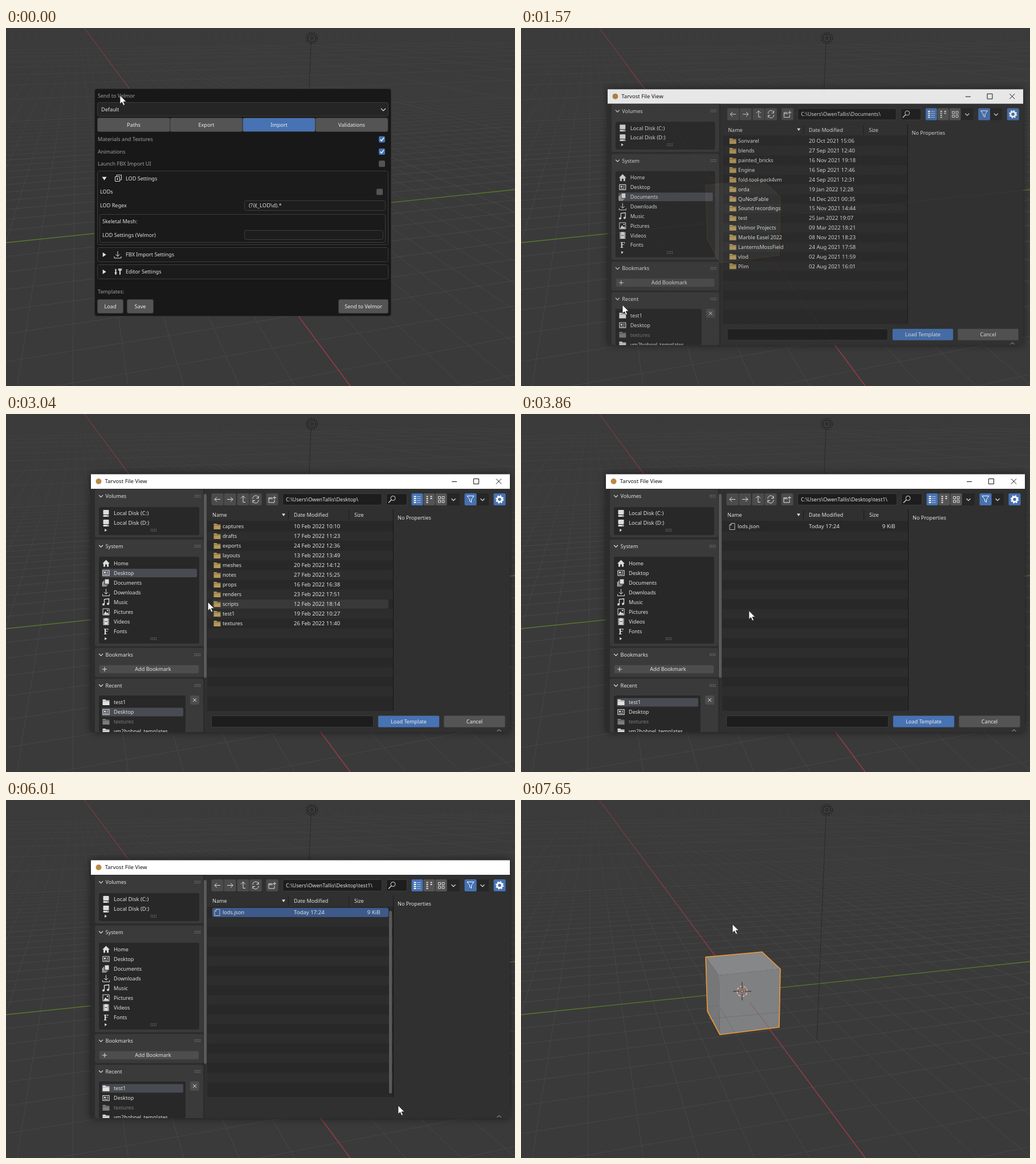
Write an HTML page that moves like this. It is 893 by 627 pixels and loops after 8 s.

```html
<!DOCTYPE html>
<html lang="en">
<head>
<meta charset="utf-8">
<title>Loading a template</title>
<style>
html, body { margin: 0; width: 100%; height: 100%; overflow: hidden; background: #3a3a3a; }
svg { display: block; width: 893px; height: 627px; }
text { font-family: "Noto Sans", "Open Sans", sans-serif; font-size: 9.1px; white-space: pre; }
</style>
</head>
<body>
<svg id="stage" viewBox="0 0 893 627" xmlns="http://www.w3.org/2000/svg"></svg>
<script>
const LOOP = 8000;
const BLUE = '#4772b3', GREY = '#545454', LIGHT = '#e2e2e2', DIM = '#a0a0a0';

// ---- drawing helpers ----
const rect = (x, y, w, h, fill, extra = '') =>
  `<rect x="${x}" y="${y}" width="${w}" height="${h}" fill="${fill}" ${extra}/>`;
const box = (x, y, w, h, fill, stroke = '#3d3d3d', r = 3) =>
  rect(x + .5, y + .5, w - 1, h - 1, fill, `rx="${r}" stroke="${stroke}"`);
const path = (d, stroke = LIGHT, width = 1, fill = 'none', extra = '') =>
  `<path d="${d}" fill="${fill}" stroke="${stroke}" stroke-width="${width}" ${extra}/>`;
const label = (x, cy, str, fill = LIGHT, anchor = 'start', size = 9.1) =>
  `<text x="${x}" y="${cy + 3.4}" fill="${fill}" text-anchor="${anchor}" style="font-size:${size}px">${str}</text>`;
const group = (id, body, extra = '') => `<g id="${id}" ${extra}>${body}</g>`;
const at = (x, y, body, extra = '') => `<g transform="translate(${x} ${y})" ${extra}>${body}</g>`;
const button = (x, y, w, h, str, fill = GREY, id = '', stroke = '#3d3d3d') =>
  rect(x + .5, y + .5, w - 1, h - 1, fill, `rx="2.5" stroke="${stroke}" ${id && `id="${id}"`}`) +
  label(x + w / 2, y + h / 2, str, '#eee', 'middle');
const chevron = (x, y, s = 3.5, c = LIGHT) =>
  path(`M${x - s} ${y - s / 2}l${s} ${s}l${s} ${-s}`, c, 1.2);
const triangle = (x, y, s, down) => down
  ? path(`M${x - s} ${y - s * .7}h${2 * s}l${-s} ${s * 1.5}z`, 'none', 0, LIGHT)
  : path(`M${x - s * .7} ${y - s}v${2 * s}l${s * 1.5} ${-s}z`, 'none', 0, LIGHT);
const grip = (x, y) =>
  path(`M${x - 5} ${y - 1.5}h10M${x - 5} ${y + 1.5}h10`, '#aaa', 1, 'none', 'stroke-dasharray="1.2 1.7"');

const ICONS = {
  disk: rect(-5, -6, 10, 8, '#ddd', 'rx="1"') + rect(-5, 3, 10, 3, '#ddd', 'rx="1"') + rect(2, 4, 2, 1, '#333'),
  home: path('M-6.5 .5L0 -6L6.5 .5H4.5V6H1.5V2H-1.5V6H-4.5V.5z', 'none', 0, '#ddd'),
  desk: path('M-5.5 -4.5h11v9h-11z', '#ddd', 1.2) + rect(-3.5, -2.5, 3, 3, '#ddd') +
    path('M1 -2h2.5M1 0h2.5M-3.5 2.5h7', '#ddd', 1),
  docs: path('M-2 -6H5V2H-2z', 'none', 0, '#ddd') + path('M-4 -3.5V4H3M-6 -1.5V6H1', '#ddd', 1.2),
  down: path('M0 -6V3M-3.5 -.5L0 3L3.5 -.5M-6 3V6H6V3', '#ddd', 1),
  music: path('M-3 4V-5L5 -6V3', '#ddd', 1.3) + '<circle cx="-4.5" cy="4" r="2" fill="#ddd"/><circle cx="3.5" cy="3" r="2" fill="#ddd"/>',
  image: path('M-5.5 -5.5h11v11h-11z', '#ddd') + path('M-4.5 5L-1 -1L1.5 2.5L3 1L5 5z', 'none', 0, '#ddd') + '<circle cx="2.5" cy="-2.5" r="1.2" fill="#ddd"/>',
  film: rect(-5, -6, 10, 12, '#ddd') + path('M-3.7 -6V6M3.7 -6V6', '#333', 1.2, 'none', 'stroke-dasharray="1.5 1.5"') + path('M-2 0H2', '#333'),
  font: '<text y="5" text-anchor="middle" fill="#ddd" style="font:bold 14px \'Noto Serif\',serif">F</text>',
  folder: path('M-6 -5H-1L0 -3.5H6V5H-6z', 'none', 0, 'currentColor') + path('M-6 -2H6', '#0006', .8),
  file: path('M-1.5 -5.5H4.5V5.5H-4.5V-2.5zM-1.5 -5.5V-2.5H-4.5', '#ccc', .9)
};
const icon = (name, x, y, color = '#ddd') => at(x, y, ICONS[name], `color="${color}"`);

// ---- viewport ----
// Ground plane: A and B set the perspective toward each axis' vanishing point.
const A = -.0533, B = .01457;
const ground = (u, v) => {
  const p = A * u, q = B * v, w = 1 + p + q;
  return [(387.3 + 122.6 * p + 3798 * q) / w, (335.6 - 20 * (p + q)) / w].map(n => n.toFixed(1)).join(' ');
};
const gridOpacity = k => k % 10 ? Math.max(0, .75 - Math.abs(k) / 55) : .85;
function grid() {
  let s = '';
  const line = (p, q, k) => {
    if (k && gridOpacity(k) > 0) s += path(`M${p}L${q}`, '#4d4d4d', 1, 'none', `opacity="${gridOpacity(k).toFixed(2)}"`);
  };
  for (let v = -40; v <= 100; v++) line(ground(-110, v), ground((-.8 - B * v) / A, v), v);
  for (let u = -100; u <= 20; u++) line(ground(u, (-.8 - A * u) / B), ground(u, 150), u);
  return s;
}
const lamp = path('M535 28L519 420', '#2a2a2a') +
  at(536.5, 17.5, '<circle r="10" fill="none" stroke="#151515" stroke-dasharray="3 2"/><circle r="7" fill="none" stroke="#151515"/>' +
    path('M0 -3L2.5 0L0 3L-2.5 0z', '#151515'));
const cube =
  path('M324 275L423 266L455 296L347 307z', 'none', 0, '#868788') +
  path('M324 275L347 307L349 411L327 370z', 'none', 0, '#767778') +
  path('M347 307L455 296L453 398L349 411z', 'none', 0, '#7f8081') +
  path('M327 362L347 360L375 408M330 383L453 372', '#6d6e6e', .8) +
  path('M402 355L436 400', '#a0414a', 1, 'none', 'stroke-dasharray="3 1"') +
  path('M324 275L423 266L455 296L453 398L349 411L327 370z', '#f09a35', 1.6, 'none', 'stroke-linejoin="round"') +
  at(388, 335, '<circle r="9" fill="none" stroke="#f2e4df" stroke-width="1.2"/><circle r="9" fill="none" stroke="#c8574c" stroke-width="1.2" stroke-dasharray="3.5 3.5"/>' +
    path('M-16 0H-5M5 0H16M0 -16V-5M0 5V16', '#252525') + '<circle r="2.2" fill="#f09a35" stroke="#222" stroke-width=".7"/>');
const viewport = rect(0, 0, 893, 627, '#3a3a3a') + grid() +
  rect(0, 0, 893, 270, 'url(#haze)') +
  path('M137.5 0L604 627', 'url(#red)', 1.4) + path('M0 376L893 283', '#587b2b', 1.3) + lamp + cube;

// ---- settings popup ----
function checkbox(x, y, on) {
  return rect(x - 5.5, y - 5.5, 11, 11, on ? BLUE : GREY, 'rx="2"') +
    (on ? path(`M${x - 3} ${y}l2.3 2.7l4 -5.5`, '#fff', 1.5) : '');
}
function popup() {
  const tabs = ['Paths', 'Export', 'Import', 'Validations'].map((name, i) =>
    button(160 + i * 127.5, 157, 128, 25, name, i === 2 ? BLUE : GREY, 'tab' + i)).join('');
  const options = ['Materials and Textures', 'Animations', 'Launch FBX Import UI'].map((name, i) =>
    label(161, 195 + i * 21.4, name, DIM) + checkbox(659.5, 195 + i * 21.4, i < 2)).join('');
  const layers = path('M191.5 260.5h8v8h-8zM194 260V257.5H202.5V266H200', '#ddd') + path('M194 264.5h3M195.5 263v3', '#ddd');
  const tools = path('M192.5 422v10M200 421v11', '#ddd', 2) + path('M197.5 421v3h5v-3M190.5 429h4', '#ddd', 1.3);
  return box(155, 106, 521, 399, '#181818', '#2c2c2c', 4) +
    label(161, 119, 'Send to Velmor', DIM) +
    box(160, 130, 511, 25, '#252525') + label(167, 142.5, 'Default') + chevron(662, 143, 4) +
    tabs + options +
    box(160, 250, 511, 130, '#1b1b1b') + triangle(172.5, 263.5, 4, true) + layers + label(210, 263.5, 'LOD Settings') +
    label(165, 287, 'LODs') + checkbox(655.5, 287, false) +
    label(165, 311, 'LOD Regex') + box(418, 302, 248, 18, '#1d1d1d') + label(426, 311, '(?i)(_LOD\\d).*', LIGHT, 'start', 9.4) +
    box(164, 326, 502, 50, '#1a1a1a') + label(169, 339, 'Skeletal Mesh:') +
    label(169, 363, 'LOD Settings (Velmor)') + box(418, 354, 244, 17, '#1d1d1d') +
    box(160, 384, 511, 26, '#1b1b1b') + triangle(172.5, 397, 4) + icon('down', 196, 397) + label(210, 397, 'FBX Import Settings') +
    box(160, 414, 511, 26, '#1b1b1b') + triangle(172.5, 427, 4) + tools + label(210, 427, 'Editor Settings') +
    label(161, 462, 'Templates:', DIM) +
    button(160, 475, 46, 25, 'Load', GREY, 'load') + button(212, 475, 47, 25, 'Save') +
    button(583, 475, 88, 25, 'Send to Velmor');
}

// ---- file dialog ----
const rowY = i => 197 + 17 * i;
const SYSTEM = [['home', 'Home'], ['desk', 'Desktop'], ['docs', 'Documents'], ['down', 'Downloads'],
  ['music', 'Music'], ['image', 'Pictures'], ['film', 'Videos'], ['font', 'Fonts']];
const DOCUMENTS = `Sonvarel|20 Oct 2021 15:06
blends|27 Sep 2021 12:40
painted_bricks|16 Nov 2021 19:18
Engine|16 Sep 2021 17:46
fold-tool-pack4vm|24 Sep 2021 12:31
orda|19 Jan 2022 12:28
QuNodFable|14 Dec 2021 00:35
Sound recordings|15 Nov 2021 14:44
test|25 Jan 2022 19:07
Velmor Projects|09 Mar 2022 18:21
Marble Easel 2022|08 Nov 2021 18:23
LanternsMossField|24 Aug 2021 17:58
vlod|02 Aug 2021 11:59
Plim|02 Aug 2021 16:01`.split('\n').map(row => row.split('|'));
const DESKTOP = ['captures', 'drafts', 'exports', 'layouts', 'meshes', 'notes', 'props', 'renders', 'scripts', 'test1', 'textures']
  .map((name, i) => [name, `${10 + i * 7 % 18} Feb 2022 1${i % 9}:${10 + i * 13 % 50}`]);
const TEST = [['lods.json', 'Today 17:24', '9 KiB']];

const listing = (id, rows) => group(id, rows.map(([name, date, size], i) =>
  icon(name.includes('.') ? 'file' : 'folder', 370.5, rowY(i), '#b5995a') + label(380, rowY(i), name) +
  label(505, rowY(i), date, LIGHT, 'start', 9.6) + label(656.5, rowY(i), size || '', LIGHT, 'end', 9.6)).join(''));

function sidebar() {
  const panel = (y, h, name) => rect(156, y, 190, h, '#3a3a3a', 'rx="3"') +
    chevron(166.5, y + 11.8) + label(174.5, y + 11.8, name) + grip(336, y + 11.8);
  const inset = (x, y, w, h) => rect(x, y, w, h, '#282828', 'rx="3"');
  const item = (name, str, y, color, size) => icon(name, 175.5, y, color) + label(189, y, str, color, 'start', size);
  const more = y => triangle(175, y, 2.6) + grip(259, y);
  return panel(132, 84, 'Volumes') + inset(163, 163, 176, 49) +
    item('disk', 'Local Disk (C:)', 174, LIGHT, 9.5) + item('disk', 'Local Disk (D:)', 191, LIGHT, 9.5) + more(203.5) +
    panel(219.7, 187, 'System') + inset(163, 250, 176, 152) +
    rect(168, 0, 167, 15, '#484b51', 'rx="2" id="place"') +
    SYSTEM.map(([name, str], i) => item(name, str, 261.5 + i * 17)).join('') + more(393.5) +
    panel(409.8, 51, 'Bookmarks') + button(163, 439, 176, 16, '', '#4d4d4d') +
    label(258, 447, 'Add Bookmark', LIGHT, 'middle') + path('M169 447h8M173 443v8', LIGHT) +
    panel(463.7, 94, 'Recent') + inset(163, 493, 152, 64) +
    rect(168, 0, 143, 15, '#484b51', 'rx="2" id="recent"') +
    item('folder', 'test1', 505, LIGHT) + item('desk', 'Desktop', 522) +
    item('folder', 'textures', 539, '#7d7d7d') + item('folder', 'vm2hobnel_templates', 556) +
    rect(323, 493, 16, 16, '#4d4d4d', 'rx="2"') + path('M328 498l6 6m0 -6l-6 6') +
    rect(347, 140, 5, 322, '#5a5a5a', 'id="sideScroll" rx="2.5"');
}
function toolbar() {
  const tile = (x, w, fill, body) => rect(x + .5, 139, w - 1, 21, fill, 'rx="2"') + at(x + w / 2, 149.5, body);
  const thumbs = path('M-5 -5h4v4h-4zM1.5 -5h4v4h-4zM-5 1.5h4v4h-4zM1.5 1.5h4v4h-4z', '#ddd');
  const gear = '<circle r="4.3" fill="none" stroke="#fff" stroke-width="3"/><circle r="6.2" fill="none" stroke="#fff" stroke-width="2" stroke-dasharray="2.4 2.47"/>';
  return tile(360, 22, '#4b4b4b', path('M5 0H-5M-1 -4L-5 0L-1 4')) +
    tile(382, 22, '#4b4b4b', path('M-5 0H5M1 -4L5 0L1 4')) +
    tile(405, 22, '#4b4b4b', path('M4 5H0V-6M-4 -2L0 -6L4 -2')) +
    tile(427, 22, '#4b4b4b', path('M-5 -1A5 5 0 0 1 5 -2M5 -6V-2H1M5 1A5 5 0 0 1 -5 2M-5 6V2H-1')) +
    tile(456, 22, '#4b4b4b', path('M-6 5.5V-3H0M-6 5.5H4V1M-6 -1H1M4 -6V0M1 -3H7')) +
    box(485, 139, 175, 21, '#1d1d1d') + '<text id="address" x="491" y="152.9" fill="#e2e2e2"/>' +
    box(667, 139, 37, 21, '#1d1d1d') + '<circle cx="679" cy="147.5" r="4" fill="none" stroke="#ddd"/>' + path('M676 150.5l-5 5', '#ddd', 1.3) +
    tile(711, 21, BLUE, path('M-6 -5h4M-6 -1.5h4M-6 2h4M-6 5.5h4', '#fff', 1.8) + path('M0 -5h6M0 -1.5h6M0 2h6M0 5.5h6', '#fff', 1, 'none', 'stroke-dasharray="1.5 1"')) +
    tile(732, 21, GREY, path('M-5 -5h3M-5 -1.5h3M-5 2h3M-5 5.5h3M2 -5h3M2 -1.5h3', '#ddd', 1.8)) +
    tile(753, 21, GREY, thumbs) + rect(774, 139, 22, 21, '#262626') + chevron(785, 150) +
    tile(804, 22, BLUE, path('M-6 -6H6L1.5 0V5L-1.5 3V0z', '#fff')) +
    rect(826, 139, 21, 21, '#262626') + chevron(836, 150) + tile(855, 22, BLUE, gear);
}
function dialog() {
  let stripes = '';
  for (let i = 1; i < 19; i += 2) stripes += rect(353, rowY(i) - 8.5, 326, 17, '#2d2d2d');
  return rect(149, 105, 735, 452, '#000', 'filter="url(#blur)" opacity=".55"') +
    rect(149, 105.5, 735, 451.5, '#303030') + rect(149, 105.5, 735, 25.5, '#fff') +
    '<circle cx="162.5" cy="118" r="5" fill="#bb8a45"/>' + label(173.5, 118, 'Tarvost File View', '#111', 'start', 9.6) +
    group('caption', path('M782 118.5h9M820.5 113.5h9v9h-9zM860 113.5l9 9m0 -9l-9 9', '#111')) +
    `<g clip-path="url(#frame)">${rect(149, 131, 200, 426, '#2c2c2c')}${sidebar()}</g>` + toolbar() +
    rect(353, 167, 326, 353, '#282828') + stripes + rect(353, 167, 326, 20, '#303030') +
    label(362, 177, 'Name') + triangle(487, 176.5, 3, true) + label(505, 177, 'Date Modified') + label(611, 177, 'Size') +
    path('M495.5 169v16M601.5 169v16', '#1c1c1c') + path('M679.5 167V520', '#161616') +
    rect(362, 0, 309, 16, '#fff', 'id="hover" rx="3" opacity=".08"') +
    rect(362, 189, 309, 16, '#3d5a8a', 'id="selected" rx="3"') +
    listing('documents', DOCUMENTS) + listing('desktop', DESKTOP) + listing('test', TEST) +
    rect(672, 194, 5, 320, '#5a5a5a', 'id="listScroll" rx="2.5"') +
    label(687, 182, 'No Properties') +
    group('footer', box(360, 528, 285, 21, '#1d1d1d') + group('filename', label(367, 538.5, 'lods.json')) +
      button(652, 527.5, 109, 22, 'Load Template', BLUE, 'confirm', '#353535') +
      button(767.5, 527.5, 109, 22, 'Cancel', GREY, '', '#353535')) +
    path('M861.5 556l3.5 -3.5l3.5 3.5', '#bbb');
}

const stage = document.getElementById('stage');
stage.innerHTML = `<defs>
  <linearGradient id="haze" x2="0" y2="1"><stop stop-color="#3b3b3b" stop-opacity=".8"/><stop offset="1" stop-color="#3b3b3b" stop-opacity="0"/></linearGradient>
  <linearGradient id="red" gradientUnits="userSpaceOnUse" x1="137" y1="0" x2="400" y2="350"><stop stop-color="#6b3a3e"/><stop offset="1" stop-color="#a03b47"/></linearGradient>
  <filter id="blur" x="-10%" y="-10%" width="120%" height="120%"><feGaussianBlur stdDeviation="7"/></filter>
  <clipPath id="frame"><path d="M149 131H884V557H149z"/></clipPath></defs>` +
  viewport + group('popup', popup()) + group('dialog', dialog()) +
  '<circle id="click" r="10" fill="#c3cf4a" opacity=".85"/>' +
  group('cursor', path('M0 0V15L3.5 11.8L6 17.5L8.5 16.4L6 11H11z', '#222', .8, '#fff'));

// ---- timeline ----
const el = Object.fromEntries([...stage.querySelectorAll('[id]')].map(e => [e.id, e]));
const show = (id, on) => el[id].setAttribute('visibility', on ? 'inherit' : 'hidden');
const set = (id, name, value) => el[id].setAttribute(name, value);
const clamp = x => Math.max(0, Math.min(1, x));
const smooth = x => x * x * (3 - 2 * x);

// Cursor moves: start, end, then the point reached.
const MOVES = [
  [70, 840, 178, 482], [900, 985, 178, 485], [2000, 2220, 208, 274], [2740, 3180, 399.5, 346.5],
  [3820, 4420, 430, 195], [4930, 5590, 688, 535], [6500, 7240, 382, 223], [7420, 7650, 371, 217.5]
];
const CLICKS = [[1180, 1380], [2220, 2340], [3380, 3460], [3520, 3600], [4620, 4750], [5870, 6000]];

function cursorAt(t) {
  let x = 200, y = 118;
  for (const [start, end, toX, toY] of MOVES) {
    const k = smooth(clamp((t - start) / (end - start)));
    x += (toX - x) * k;
    y += (toY - y) * k;
  }
  return [x, y];
}

function update(t) {
  const [x, y] = cursorAt(t);
  const over = (l, top, w, h) => x >= l && x < l + w && y >= top && y < top + h;
  set('cursor', 'transform', `translate(${x.toFixed(1)} ${y.toFixed(1)})`);
  set('click', 'cx', x);
  set('click', 'cy', y + 1);
  show('click', CLICKS.some(([start, end]) => t >= start && t < end));

  show('popup', t < 1450);
  set('tab0', 'fill', over(160, 157, 128, 25) ? '#656565' : GREY);
  set('load', 'fill', t >= 1180 ? BLUE : over(160, 475, 46, 25) ? '#656565' : GREY);

  const opening = clamp((t - 1480) / 200), closing = clamp((t - 6015) / 180);
  const size = .95 + .05 * (1 - (1 - opening) ** 3) - .08 * closing ** 2;
  show('dialog', opening > 0 && closing < 1);
  set('dialog', 'opacity', Math.min(1, opening * 1.93) * (1 - closing));
  set('dialog', 'transform', `translate(516.5 331) scale(${size}) translate(-516.5 -331)`);

  const inDesktop = t >= 2290, inTest = t >= 3590;
  el.address.textContent = 'C:\\Users\\OwenTallis\\' + (inTest ? 'Desktop\\test1\\' : inDesktop ? 'Desktop\\' : 'Documents\\');
  set('place', 'y', inDesktop ? 271 : 288);
  show('place', !inTest);
  set('recent', 'y', inTest ? 497.5 : 514.5);
  show('recent', inDesktop);
  show('documents', !inDesktop);
  show('desktop', t >= 2430 && !inTest);
  show('test', t >= 3650);

  const row = Math.floor((y - 188.5) / 17);
  const rows = inTest ? TEST.length : DESKTOP.length;
  show('hover', t >= 2430 && t < 6000 && over(353, 188.5, 318, 17 * rows));
  set('hover', 'y', 189 + row * 17);
  show('selected', t >= 4690);
  show('filename', t >= 4690);
  show('sideScroll', t >= 2960);
  show('listScroll', t >= 5300);
  set('confirm', 'fill', over(652, 528, 109, 21) ? '#5a83c2' : BLUE);
  show('footer', t < 6005);
  show('caption', t < 6005);
}

const begin = performance.now();
function frame() {
  update((performance.now() - begin) % LOOP);
  requestAnimationFrame(frame);
}
frame();
</script>
</body>
</html>
```
